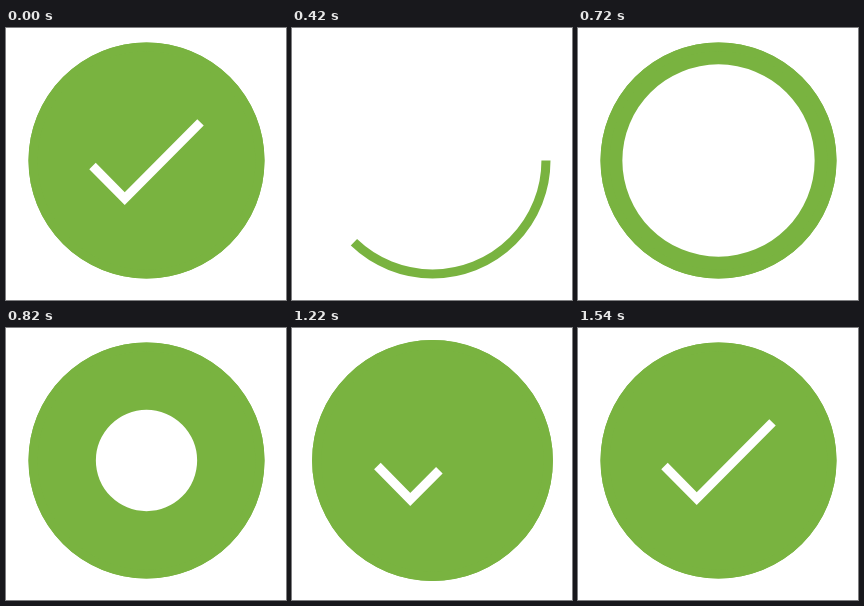
Write an HTML page with a canvas that moves like this. It is 280 px wide and 272 px high and loops after 1880 ms.

```html
<!DOCTYPE html>
<html lang="en">
<head>
<meta charset="utf-8">
<title>Success check</title>
<style>
  html, body { margin: 0; height: 100%; overflow: hidden; background: #fff; }
  canvas { display: block; }
</style>
</head>
<body>
<canvas id="stage" width="280" height="272"></canvas>
<script>
const ctx = document.getElementById('stage').getContext('2d');
const GREEN = '#79b340', LOOP = 1880, STEP = 20;
const RADIUS = 118, UNIT = RADIUS / 26;

// cubic-bezier(x1, 0, x2, 1), solved by bisection
function bezier(x1, x2) {
  return x => {
    if (x <= 0) return 0;
    if (x >= 1) return 1;
    let lo = 0, hi = 1, s;
    for (let i = 0; i < 24; i++) {
      s = (lo + hi) / 2;
      const bx = 3 * (1 - s) * (1 - s) * s * x1 + 3 * (1 - s) * s * s * x2 + s * s * s;
      if (bx < x) lo = s; else hi = s;
    }
    return s * s * (3 - 2 * s);
  };
}
const strokeEase = bezier(.65, .45);
const easeInOut = bezier(.42, .58);

function strokeDash(color, visible) {
  if (visible <= 0) return;
  ctx.strokeStyle = color;
  ctx.lineWidth = 2;
  ctx.setLineDash([visible, 400]);
  ctx.stroke();
}

function draw(t) {
  if (t < STEP) t = LOOP;
  const during = (ease, start, length) => ease((t - start) / length);
  const pulse = during(easeInOut, 1164, 180) - during(easeInOut, 1344, 180);
  const hole = Math.max(0, RADIUS - 142 * during(easeInOut, 592, 470)) / UNIT;

  ctx.setTransform(1, 0, 0, 1, 0, 0);
  ctx.fillStyle = '#fff';
  ctx.fillRect(0, 0, 280, 272);
  ctx.translate(140.5, 132.5);
  ctx.scale(UNIT * (1 + .1 * pulse), UNIT * (1 + .1 * pulse));

  if (hole < 26) {
    ctx.beginPath();
    ctx.arc(0, 0, 26, 0, 2 * Math.PI);
    ctx.arc(0, 0, hole, 0, 2 * Math.PI, true);
    ctx.fillStyle = GREEN;
    ctx.fill('evenodd');
  }

  ctx.beginPath();
  ctx.arc(0, 0, 25, 0, 2 * Math.PI);
  strokeDash(GREEN, 166 * during(strokeEase, 90, 696));

  ctx.beginPath();
  ctx.moveTo(-11.9, 1.2);
  ctx.lineTo(-4.8, 8.4);
  ctx.lineTo(11.9, -8.4);
  strokeDash('#fff', 48 * during(strokeEase, 1042, 360));
}

const begin = performance.now();
function tick() {
  const t = (performance.now() - begin) % LOOP;
  draw(Math.floor(t / STEP) * STEP);
  requestAnimationFrame(tick);
}
tick();
</script>
</body>
</html>
```
